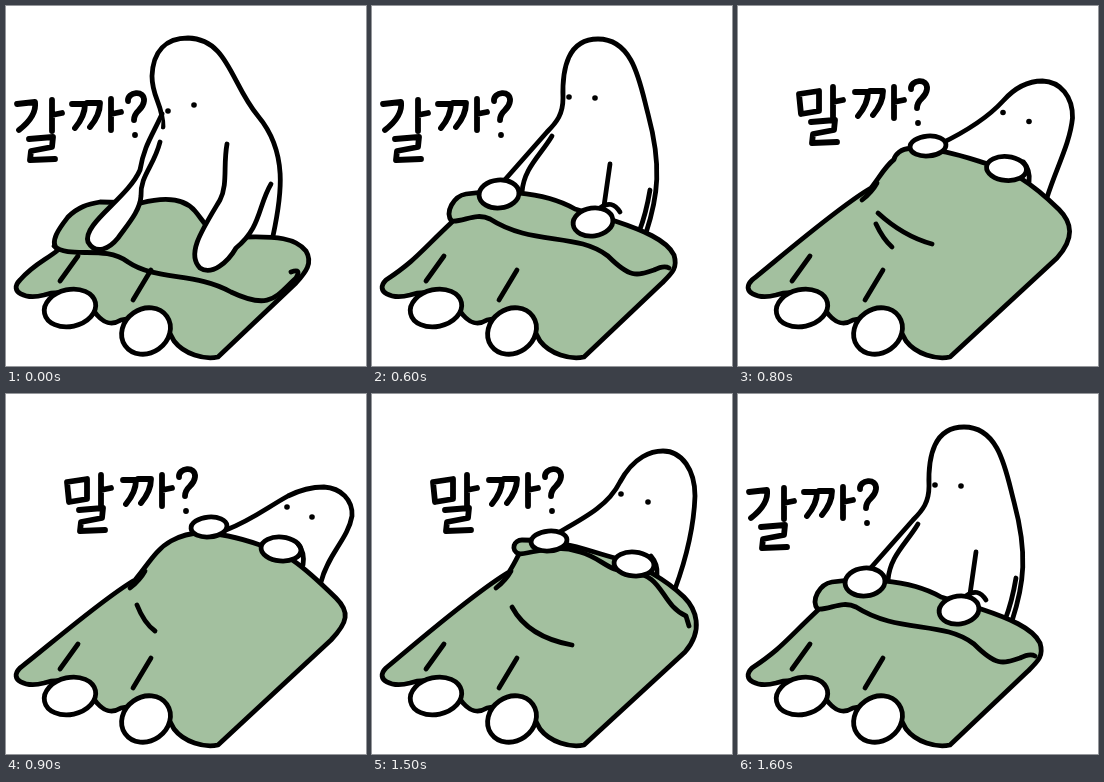
An HTML page that plays this animation: 360x360 px, repeating every 1.7 s.

```html
<!DOCTYPE html>
<html lang="ko">
<head>
<meta charset="utf-8">
<style>
  html, body { margin: 0; width: 100%; height: 100%; overflow: hidden; background: #fff; }
  svg { display: block; width: 100vw; height: 100vh; }
  path, ellipse { fill: none; stroke: #000; stroke-width: 4.8; stroke-linecap: round; stroke-linejoin: round; }
  .cloth { fill: #a3c09f; }
  .skin { fill: #fff; }
  .letters { stroke-width: 5.8; }
</style>
</head>
<body>
<svg viewBox="0 0 360 360" role="img"></svg>
<script>
const svg = document.querySelector('svg');

const path = (d, cls = '') => `<path class="${cls}" d="${d}"/>`;
const eye = (x, y) => `<circle cx="${x}" cy="${y}" r="2.8"/>`;
const blob = (x, y, rx, ry, turn) =>
  `<ellipse class="skin" rx="${rx}" ry="${ry}" transform="translate(${x} ${y}) rotate(${turn})"/>`;

// Blends every number of two strings of the same form.
function blend(a, b, u) {
  const number = /-?[\d.]+/g, ends = b.match(number);
  let i = 0;
  return a.replace(number, n => +n + (ends[i++] - n) * u);
}

// Hand lettering: each stroke group is placed by its starting point.
const jamo = {
  g: 'h13q0 12-10 24',
  a: 'v31m0-16l10-2',
  r: 'l24-2-1 10-21 4-1 9 25-1',
  m: 'l2 20 18-3v-20z'
};
const put = (name, x, y) => `M${x} ${y}${jamo[name]}`;
const kka = (x, y) => put('g', x, y) + put('g', x + 15, y - 1) + put('a', x + 39, y - 5)
  + `M${x + 56} ${y - 3}c-1-9 17-12 16 0c-1 10-10 9-10 19m1 15h.01`;
const words = {
  갈까: 'M11 98l18-2q2 14-16 28' + put('a', 46, 94) + put('r', 23, 133) + kka(66, 98),
  말까: put('m', 61, 88) + put('a', 95, 81) + put('r', 73, 116) + kka(117, 86)
};

const hem = 'L212 351C198 354 178 348 168 335C160 318 150 306 115 314C105 320 98 317 91 309'
  + 'C80 292 60 282 38 289C20 294 2 286 14 274Z';
const creases = path('M72 250L54 275M145 264L127 294');
const feet = blob(64, 302, 26, 18.5, -12) + blob(140, 325, 25.5, 22, -35);

const sitting = {
  word: '갈까',
  body: 'M157 121C157 98 146 92 146 70C147 45 160 32 182 32C222 33 225 78 252 110C282 146 276 188 267 230',
  eyes: eye(162, 105) + eye(188, 99),
  cloth: 'M14 274C28 258 40 254 52 244C42 236 55 220 62 211C72 201 82 198 94 196L135 197'
    + 'C158 191 178 192 189 205C195 212 198 218 204 223L238 231C270 230 290 232 300 245C307 257 300 266 290 277',
  folds: 'M48 240C64 254 98 238 122 256C150 275 190 266 225 286C265 305 270 290 290 272Q296 262 285 266',
  arms: path('M156 108C146 130 138 140 134 164C122 192 76 218 82 236C90 250 104 242 112 232'
      + 'C122 218 134 205 135 190C134 170 148 160 154 136', 'skin')
    + path('M221 138C217 160 222 178 214 194C196 224 180 248 194 262C206 270 222 256 230 242'
      + 'C255 222 252 200 265 178', 'skin')
};

const pulling = {
  word: '갈까',
  body: 'M130 177L175 126C185 116 191 108 191 92C190 62 196 33 226 33C262 33 268 78 276 108C290 160 286 190 274 227'
    + 'M180 130C168 150 152 162 150 186M238 158L232 200M278 184Q274 208 267 226',
  eyes: eye(197, 91) + eye(223, 92),
  cloth: 'M14 274C44 254 48 246 80 216C72 206 82 190 94 188C120 184 170 184 203 203L243 215'
    + 'C270 224 295 234 302 249C306 262 300 267 290 277',
  folds: 'M80 215C92 216 104 206 118 213C160 240 205 226 236 250C258 272 264 270 282 264Q292 259 297 262',
  arms: blob(127, 188, 20, 14, -5) + blob(221, 216, 20, 14, -8) + path('M228 202Q240 193 248 206')
};

// Lying back: u = 0 just leaned over, u = 1 hidden up to the chin.
const lying = (u, folds) => ({
  word: '말까',
  body: blend(
    'M184 140C212 124 236 112 248 88C262 62 280 57 291 57C310 57 323 76 323 102C322 130 314 165 303 195',
    'M220 136C246 126 262 113 282 102C298 94 310 93 318 93C335 94 347 106 346 122C342 145 322 160 315 188', u),
  eyes: blend(eye(249, 100) + eye(276, 108), eye(281, 113) + eye(306, 123), u),
  cloth: blend(
    'M14 274C36 256 100 200 137 178C141 172 144 166 147 160C138 156 142 146 150 146'
      + 'C190 146 210 155 243 164C270 172 292 184 312 203C324 215 332 236 313 258',
    'M14 274C40 254 100 202 129 186C141 172 150 155 165 147C176 141 184 139 195 139'
      + 'C215 139 234 144 254 151C280 160 290 165 330 204C344 218 342 228 325 246', u),
  folds: 'M124 194Q134 186 139 177' + folds,
  arms: blend(
    blob(177, 147, 18, 10, -5) + blob(262, 170, 20, 12, 5) + path('M279 162Q286 170 285 181'),
    blob(203, 133, 18, 10, -5) + blob(275, 155, 20, 12, 5) + path('M292 150Q299 158 297 171'), u)
});

const leaning = lying(0, 'M140 213Q156 243 200 251'
  + 'M146 160C160 160 180 149 208 158C230 164 236 178 258 178C292 180 288 210 314 222L317 232');
const covering = lying(0.5, 'M140 207Q165 230 194 238M138 218Q145 233 154 241');
const hiding = lying(1, 'M131 211Q138 229 149 237');

function draw(pose) {
  svg.setAttribute('aria-label', pose.word + '?');
  svg.innerHTML = path(pose.body) + path(pose.cloth + hem, 'cloth') + path(pose.folds)
    + creases + pose.arms + feet + pose.eyes + path(words[pose.word], 'letters');
}

const timeline = [
  [600, sitting], [700, pulling], [800, leaning], [900, covering],
  [1400, hiding], [1500, covering], [1600, leaning], [1700, pulling]
];
const start = performance.now();
let shown;

function update(now) {
  const t = Math.max(0, now - start) % 1700;
  const pose = timeline.find(([end]) => t < end)[1];
  if (pose !== shown) draw(shown = pose);
  requestAnimationFrame(update);
}
update(start);
</script>
</body>
</html>
```
